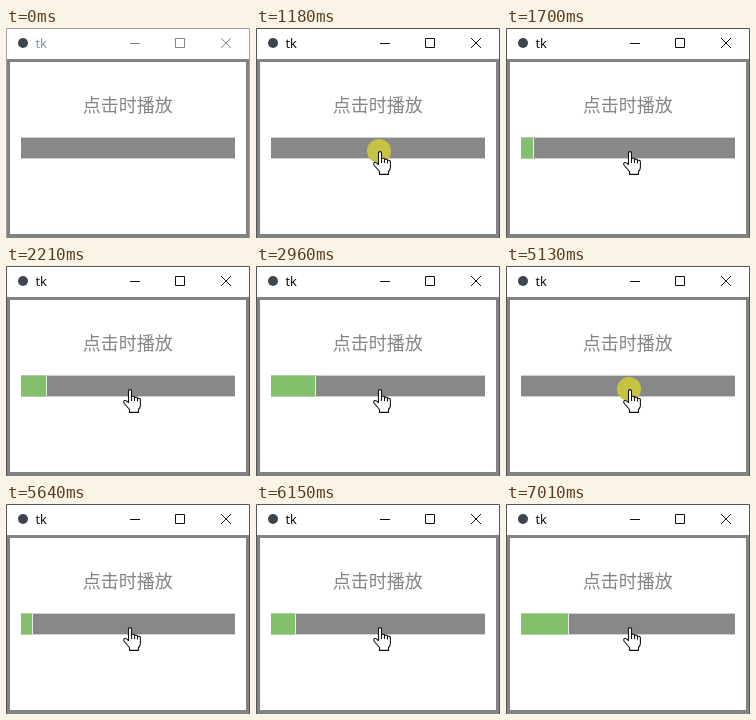
An HTML page for the animation above (7.03 s loop, 244x210 px).

```html
<!DOCTYPE html>
<html lang="zh">
<head>
<meta charset="utf-8">
<style>
  html, body { margin: 0; width: 100%; height: 100%; overflow: hidden; background: #fff; }
  svg { display: block; }
  #title { font: 13px "Open Sans", "Noto Sans", sans-serif; }
  #label { font: 18px "Noto Sans CJK SC", "Noto Sans CJK", sans-serif; font-weight: 300; fill: #858585; }
</style>
</head>
<body>
<svg width="244" height="210" viewBox="0 0 244 210">
  <rect width="244" height="210" fill="#fff"/>
  <circle cx="17" cy="15" r="5" fill="#3d464e"/>
  <text id="title" x="29.5" y="20">tk</text>
  <path id="buttons" fill="none" d="M124 15.5h10M169.5 10.5h9v9h-9zM215 10l10 10m0-10l-10 10"/>
  <path fill="#828282" fill-rule="evenodd" d="M0 31H244V210H0zM4 34V206H240V34z"/>
  <path id="frame" fill="none" d="M.5 210V.5H243.5V210"/>
  <text id="label" x="121.7" y="84" text-anchor="middle">点击时播放</text>
  <rect x="15" y="109.6" width="214" height="20.8" fill="#888"/>
  <g id="progress">
    <rect id="fill" x="15" y="109.6" height="20.8" fill="#83c06b"/>
    <rect id="edge" y="109.6" width="1" height="20.8" fill="#e6f0e0"/>
  </g>
  <circle id="click" cx="123" cy="123" r="12" fill="#c6c343"/>
  <g id="hand" fill="#fff" stroke="#111" stroke-width="1.1" stroke-linejoin="round">
    <path d="M5.5 13.5V2Q5.5.6 7 .6T8.5 2V7.6Q11.5 6.6 11.5 8.4Q14.5 7.6 14.5 9.4Q17.4 8.8 17.4 11V16.5Q17.4 18.5 15.5 20.5V23.4H6.5V20.5L1.3 14.5Q0 12.4 1.5 11.6Q3 11 5.5 13.5z"/>
    <path fill="none" d="M8.5 7.6v4.4M11.5 8.4v3.6M14.5 9.4v3"/>
  </g>
</svg>
<script>
const LOOP = 7030, START = 1180, STOP = 3970, RESTART = 5130;
const PRESS = 70, DELAY = 35, SPEED = 0.0258, LEFT = 14;
const $ = id => document.getElementById(id);
const set = (id, attrs) => {
  for (const name in attrs) $(id).setAttribute(name, attrs[name]);
};
const show = (id, on) => set(id, { visibility: on ? 'visible' : 'hidden' });

function draw(t) {
  const active = t >= START;
  set('title', { fill: active ? '#000' : '#7b8c99' });
  set('buttons', { stroke: active ? '#111' : '#858585' });
  set('frame', { stroke: active ? '#555' : '#a0a0a0' });

  // The pointer slides in from the left edge.
  const p = Math.min(1, Math.max(0, (t - 590) / 180));
  show('hand', t >= 610);
  set('hand', { transform: `translate(${-17 + 134 * p * (2 - p)} 123)` });
  show('click', [START, STOP, RESTART].some(c => t >= c && t < c + PRESS));

  // Each play fills the bar from zero until the next click.
  const begin = (t < STOP ? START : RESTART) + DELAY;
  const end = Math.round(LEFT + SPEED * (t - begin));
  const playing = end > LEFT + 1;
  show('progress', playing);
  if (playing) {
    set('fill', { width: end - LEFT - 1 });
    set('edge', { x: end });
  }
}

const origin = performance.now();
function tick() {
  draw((performance.now() - origin) % LOOP);
  requestAnimationFrame(tick);
}
tick();
</script>
</body>
</html>
```
